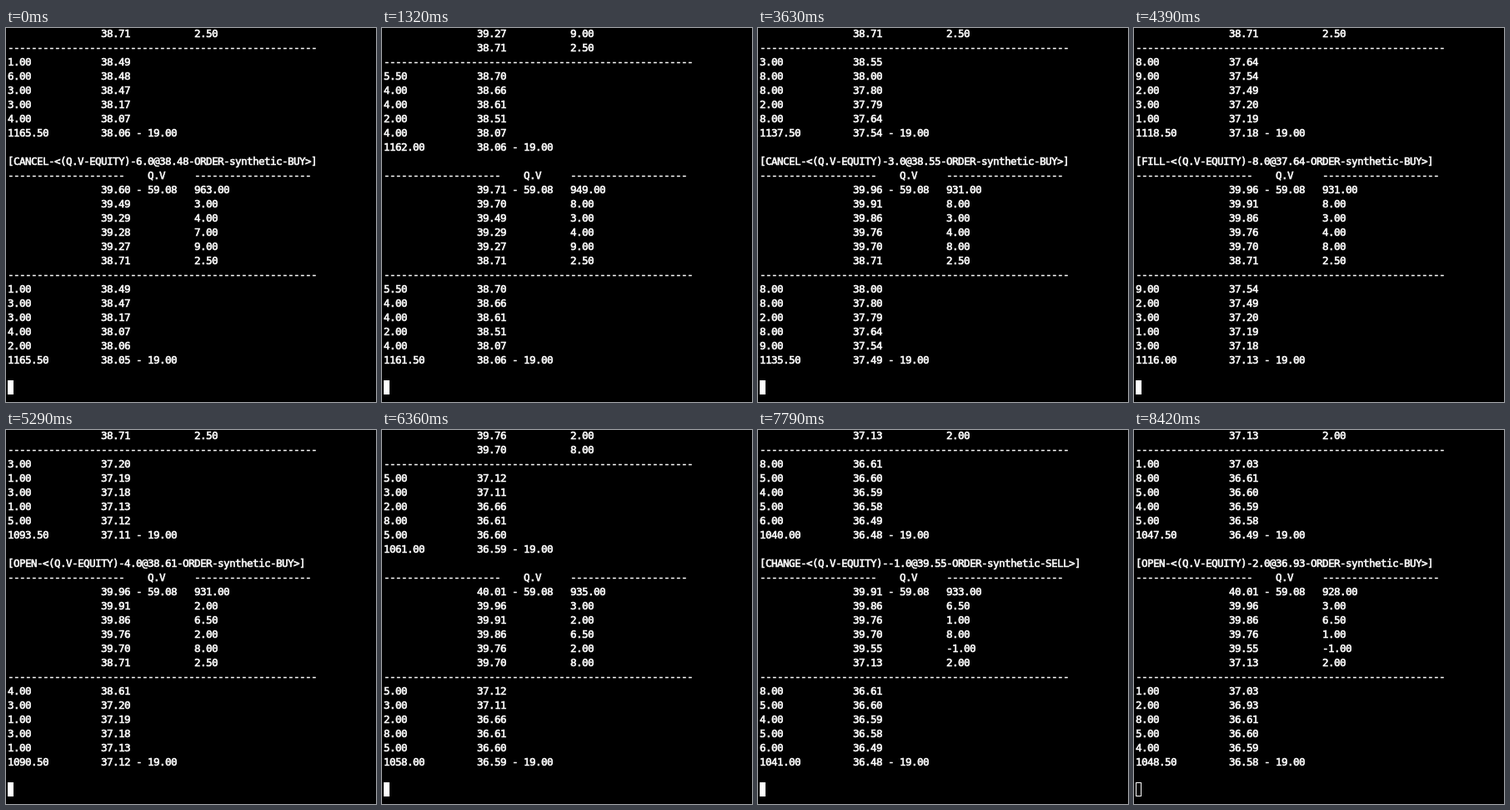
These frames come from a looping animation (444x448 px, 8520 ms). An HTML page:

```html
<!DOCTYPE html>
<html lang="en">
<head>
<meta charset="utf-8">
<title>Order book log</title>
<style>
  html, body { margin: 0; width: 100%; height: 100%; overflow: hidden; background: #000; }
  pre {
    position: absolute; left: 2px; top: -2px; margin: 0; color: #fff;
    font: 12.5px/17px "DejaVu Sans Mono", monospace;
    letter-spacing: calc(7px - 1ch);
    -webkit-text-stroke: .6px #fff;
  }
  #cursor {
    position: absolute; left: 2px; top: 422px; width: 7px; height: 17px;
    box-sizing: border-box; border: 1px solid #fff; background: #fff;
  }
  #cursor.hollow { background: none; }
</style>
</head>
<body>
<pre id="log"></pre>
<div id="cursor"></div>
<script>
const LOOP = 8520, ROWS = 25, DEPTH = 5, TICKER = 'Q.V';

let seed = 7;
function randomSize() {
  seed = seed * 16807 % 2147483647;
  return 1 + seed % 9;
}

// Resting orders at the start, price:size; a missing size is drawn at random.
const openBook = text => new Map(text.split(' ').map(level => {
  const [price, size] = level.split(':');
  return [+price, size ? +size : randomSize()];
}));
const book = {
  SELL: openBook('38.71:2.5 39.27:9 39.28:7 39.29:4 39.49:3 39.6 39.7:8 39.71 39.76 39.86 39.91 39.96:3 40.01'),
  BUY: openBook('38.49:1 38.48:6 38.47:3 38.17:3 38.07:4 38.06:2 38.05 38 37.8 37.79 37.64 37.54 37.49 ' +
    '37.2 37.19 37.18 37.13 37.12 37.11 36.66:2 36.61 36.6 36.59 36.49 36.48 36.47')
};

// On the way to each step the market fills all bids above `bid` and asks below
// `ask`, then works through `log`; `batch` arrives at the step, newest first.
const SCENES = [
  { step: 0, rest: { SELL: 963, BUY: 1165.5 }, batch: ['CANCEL all 38.48 BUY'] },
  { step: 13, rest: { SELL: 949, BUY: 1161.5 }, bid: 38.07,
    log: ['OPEN 2 38.51 BUY', 'OPEN 4 38.61 BUY', 'CANCEL all 39.28 SELL', 'OPEN 4 38.66 BUY',
      'CANCEL all 39.6 SELL', 'OPEN 5.5 38.7 BUY'] },
  { step: 25, rest: { SELL: 949, BUY: 1159.5 }, bid: 38.61,
    log: ['OPEN 2.5 38.55 BUY', 'CANCEL all 39.27 SELL', 'OPEN 2 38.45 BUY', 'OPEN 1 38.65 SELL',
      'CANCEL all 38.05 BUY', 'CANCEL all 39.29 SELL', 'OPEN 2 38.63 SELL', 'OPEN 2 38.6 BUY', 'OPEN 3 38.6 SELL'],
    batch: ['FILL 3 38.6 SELL', 'CHANGE 4 38.61 BUY', 'CHANGE 3 38.6 SELL', 'FILL 4 38.61 BUY',
      'FILL 3 38.6 SELL', 'FILL 2 38.6 BUY', 'TRADE 2 38.6'] },
  { step: 36, rest: { SELL: 931, BUY: 1135.5 }, bid: 38, ask: 38.71,
    log: ['CANCEL all 39.49 SELL', 'CANCEL all 39.71 SELL', 'OPEN 3 38.55 BUY'],
    batch: ['CANCEL all 38.55 BUY'] },
  { step: 52, rest: { SELL: 931, BUY: 1090.5 }, bid: 37.2,
    log: ['CHANGE 2 39.91 SELL', 'CHANGE 6.5 39.86 SELL', 'CHANGE 2 39.76 SELL'],
    batch: ['OPEN 4 38.61 BUY'] },
  { step: 71, rest: { SELL: 937.5, BUY: 1034.5 }, bid: 36.66, ask: 39.7,
    log: ['OPEN 2 37.13 SELL', 'OPEN 0 39.55 SELL', 'CHANGE 1 39.76 SELL'],
    batch: ['CHANGE 5 36.65 SELL', 'FILL 2 36.66 BUY', 'OPEN 5 36.65 SELL'] },
  { step: 84, rest: { SELL: 928, BUY: 1048.5 }, ask: 37.13,
    log: ['OPEN 5 36.58 BUY', 'CHANGE -1 39.55 SELL', 'OPEN 1 37.03 BUY', 'CANCEL all 39.91 SELL',
      'CANCEL all 39.7 SELL'],
    batch: ['OPEN 2 36.93 BUY'] }];
const STEPS = SCENES.at(-1).step + 1;

const money = n => n.toFixed(2);
const decimal = n => Number.isInteger(n) ? n.toFixed(1) : String(n);
const bestFirst = side => [...book[side]].sort((p, q) => side === 'SELL' ? p[0] - q[0] : q[0] - p[0]);

function parseEvent(text) {
  const [kind, size, price, side] = text.split(' ');
  return { kind, side, price: +price, size: size === 'all' ? book[side].get(+price) : +size };
}

function eventLine({ kind, size, price, side }) {
  const order = side ? `ORDER-synthetic-${side}` : 'synthetic';
  return `[${kind}-<(${TICKER}-EQUITY)-${decimal(size)}@${decimal(price)}-${order}>]`;
}

// Runs oldest first; a change keeps what is left after the fills before it.
function apply(events) {
  let traded = 0;
  for (const { kind, side, price, size } of [...events].reverse()) {
    const levels = book[side];
    if (kind === 'OPEN') levels.set(price, size);
    if (kind === 'CHANGE' && levels.has(price)) levels.set(price, size - traded);
    if (kind === 'FILL') traded += size;
    if (kind === 'FILL' || kind === 'CANCEL') levels.delete(price);
  }
}

function sideRows(side, limit, rest) {
  const levels = bestFirst(side);
  const rows = levels.slice(0, DEPTH).map(level => level.map(money));
  return [...rows, [`${money(levels[DEPTH][0])} - ${limit}`, money(rest)]];
}

function bookLines(rest) {
  const rule = '-'.repeat(20);
  return [
    `${rule}    ${TICKER}     ${rule}`,
    ...sideRows('SELL', '59.08', rest.SELL).reverse().map(([price, size]) => ' '.repeat(16) + price.padEnd(16) + size),
    '-'.repeat(53),
    ...sideRows('BUY', '19.00', rest.BUY).map(([price, size]) => size.padEnd(16) + price),
    ''];
}

function marketFills({ bid = Infinity, ask = 0 }) {
  const fills = (side, hit) => bestFirst(side).filter(([price]) => hit(price))
    .map(([price]) => `FILL all ${price} ${side}`);
  return [...fills('SELL', price => price < ask), ...fills('BUY', price => price > bid)];
}

function buildScreens() {
  const screens = [];
  let last = SCENES[0], lines = bookLines(last.rest);
  const print = (texts, rest) => {
    const events = texts.map(parseEvent);
    apply(events);
    const next = bookLines(rest);
    screens.push([...lines, ...events.map(eventLine), ...next].slice(-ROWS).join('\n'));
    lines = next;
  };
  for (const scene of SCENES) {
    const span = scene.step - last.step;
    const events = [...marketFills(scene), ...scene.log || []];
    const due = n => Math.floor(events.length * n / (span - 1));
    const restAt = (side, n) =>
      Math.round((last.rest[side] + (scene.rest[side] - last.rest[side]) * n / span) * 2) / 2;
    for (let n = 1; n < span; n++) {
      print(events.slice(due(n - 1), due(n)), { SELL: restAt('SELL', n), BUY: restAt('BUY', n) });
    }
    print(scene.batch || [], scene.rest);
    last = scene;
  }
  return screens;
}

const screens = buildScreens();
const log = document.getElementById('log'), cursor = document.getElementById('cursor');
let shown = -1;
function draw() {
  const step = Math.floor(performance.now() % LOOP / LOOP * STEPS);
  if (step !== shown) {
    shown = step;
    log.textContent = screens[step];
    cursor.className = step === STEPS - 1 ? 'hollow' : '';
  }
  requestAnimationFrame(draw);
}
draw();
</script>
</body>
</html>
```
